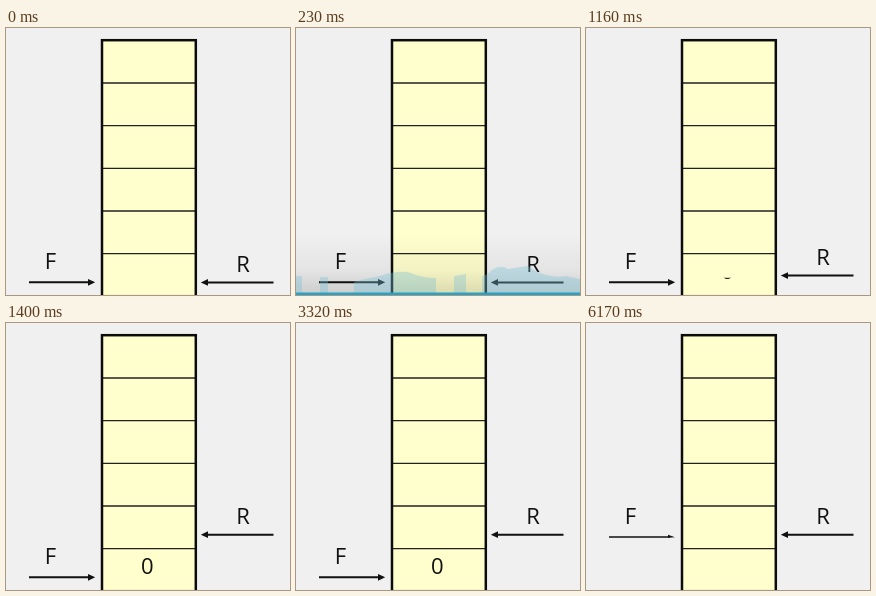
Recreate the animation shown at these times as an HTML page. Size 284 px wide and 267 px high, loop 8000 ms.

```html
<!DOCTYPE html>
<html lang="en">
<head>
<meta charset="utf-8">
<title>Queue</title>
<style>
  html, body { margin: 0; width: 100%; height: 100%; overflow: hidden; background: #f0f0f1; }
  svg { display: block; width: 284px; height: 267px; }
  text { font: 22px "Open Sans", "Noto Sans", sans-serif; text-anchor: middle; fill: #111; }
</style>
</head>
<body>
<svg viewBox="0 0 284 267">
  <defs>
    <linearGradient id="fade" x1="0" y1="0" x2="0" y2="1">
      <stop offset="0" stop-color="#000" stop-opacity="0"/>
      <stop offset=".6" stop-color="#000" stop-opacity=".05"/>
      <stop offset="1" stop-color="#000" stop-opacity=".15"/>
    </linearGradient>
    <clipPath id="wipe"><rect id="wipeBox" x="130" width="24"/></clipPath>
  </defs>
  <rect width="284" height="267" fill="#f0f0f1"/>
  <rect x="96" y="12.2" width="93.8" height="256" fill="#ffffcd"/>
  <path d="M96 55H190M96 97.6H190M96 140.3H190M96 183H190M96 225.6H190" stroke="#222" stroke-width="1.3"/>
  <rect x="96" y="12.2" width="93.8" height="256" fill="none" stroke="#0c0c0c" stroke-width="2.5"/>
  <text x="141.3" y="251" clip-path="url(#wipe)">0</text>

  <text id="frontLabel" x="44.5" y="240.5">F</text>
  <g id="frontArrow">
    <path id="frontLine" d="M23 254.3H84" stroke="#111"/>
    <path id="frontHead" fill="#111"/>
  </g>
  <g id="rear">
    <text x="237" y="244">R</text>
    <path d="M267.5 254.4H200" stroke="#111" stroke-width="2"/>
    <path d="M194.8 254.4L202 251V257.8Z" fill="#111"/>
  </g>

  <rect id="shade" y="205" width="284" height="62" fill="url(#fade)"/>
  <g id="player">
    <path fill="#78bfd6" fill-opacity=".36" d="M0 267V248H6V267ZM24 267V249H32V267ZM58 267V254
      Q72 250 84 248Q98 243 112 244Q126 250 140 250V267ZM158 267V248L170 246V267ZM186 267V248
      Q192 247 196 242Q204 236 212 241Q224 239 232 238Q240 244 250 247Q262 250 270 248L284 251V267Z"/>
    <rect y="264.5" width="284" height="2.5" fill="#2aa2c6"/>
  </g>
</svg>
<script>
const el = id => document.getElementById(id);
const ramp = (t, from, to) => Math.min(1, Math.max(0, (t - from) / (to - from)));
const ease = p => p * p * (3 - 2 * p);
const shift = (id, y) => el(id).setAttribute("transform", `translate(0 ${-y})`);

function draw(t) {
  const shown = ramp(t, 60, 230);
  el("shade").setAttribute("opacity", shown * (1 - ramp(t, 700, 890)));
  el("player").setAttribute("opacity", shown * (1 - ramp(t, 580, 740)));

  // The digit wipes in from below and wipes out from above.
  const top = t < 3000 ? 253 - 19 * ramp(t, 1110, 1400) : 234 + 19 * ramp(t, 5895, 6140);
  el("wipeBox").setAttribute("y", top);
  el("wipeBox").setAttribute("height", 253 - top);

  shift("rear", 42.7 * ease(ramp(t, 1080, 1400)));

  const lift = ease(ramp(t, 5940, 6170));
  const landed = lift === 1;
  shift("frontLabel", 39.2 * lift);
  shift("frontArrow", 40.3 * lift);
  el("frontLine").setAttribute("stroke-width", landed ? 1.6 : 2);
  el("frontHead").setAttribute("d", landed ? "M89 254.6L82 252V255Z" : "M89.2 254.3L82 251V257.7Z");
}

const start = performance.now();
function tick() {
  draw((performance.now() - start) % 8000);
  requestAnimationFrame(tick);
}
tick();
</script>
</body>
</html>
```
